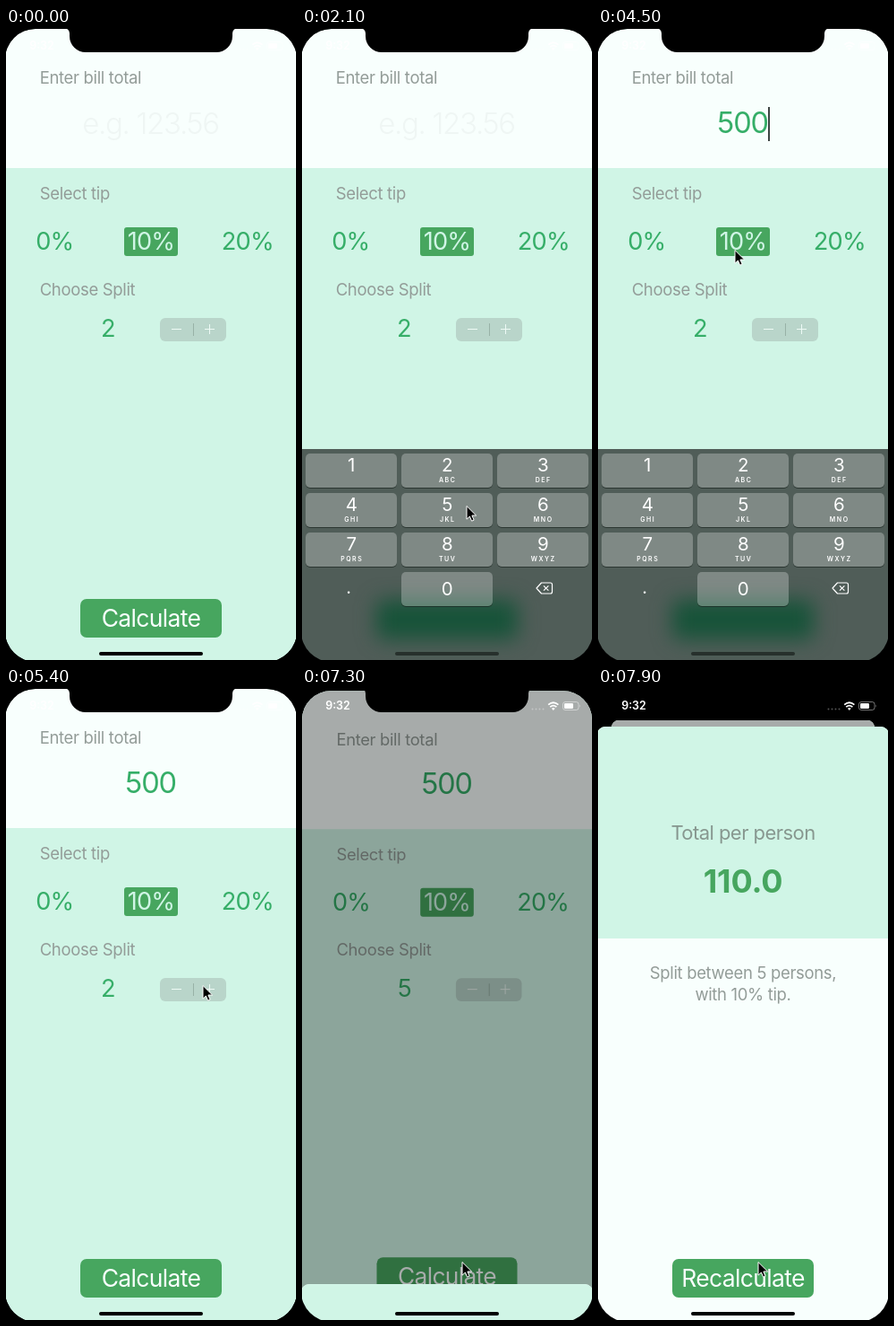
These frames come from a looping animation (324x704 px, 8 s). An HTML page:

```html
<!DOCTYPE html>
<html lang="en">
<head>
<meta charset="utf-8">
<title>Tip calculator</title>
<style>
  html, body { margin: 0; width: 100%; height: 100%; overflow: hidden; background: #000; }
  #stage { position: relative; width: 324px; height: 704px; overflow: hidden; background: #000;
    font-family: Inter, Roboto, "Liberation Sans", sans-serif; }
  #stage div, #stage svg { position: absolute; }
  .t { white-space: pre; line-height: 1; font-weight: 400; letter-spacing: -.025em; }
  .label { letter-spacing: -.018em; }
  #page { inset: 0; transform-origin: 50% 1px; }
  #dim { inset: 0 -1px -2px; background: #000; opacity: 0; }
  #board { left: 0; top: 469px; width: 324px; height: 235px; overflow: hidden; background: #505d58; }
  #glow { left: 83px; width: 158px; height: 44px; border-radius: 7px; background: #175339; filter: blur(11px); }
  .key { width: 102px; height: 38px; border-radius: 5px; background: rgba(255,255,255,.27);
    box-shadow: 0 1px 0 rgba(20,30,26,.6); }
  #sheet { left: -1px; top: 43px; width: 326px; height: 663px; overflow: hidden;
    border-radius: 9px 9px 0 0; background: #f8fffd; }
  #caret { width: 1.6px; height: 38px; top: 87.5px; background: #3c4543; }
  #home { left: 103.8px; top: 694.8px; width: 116.3px; height: 4.3px; border-radius: 2.2px; }
  #cursor { left: 0; top: 0; overflow: visible; }
</style>
</head>
<body>
<div id="stage">
  <div id="page"></div>
  <div id="board"><div id="glow"></div></div>
  <div id="sheet"></div>
  <svg id="status" width="324" height="40" fill="#fff">
    <g fill-opacity=".33"><circle cx="257.5" cy="23.5" r="1"/><circle cx="261.5" cy="23.5" r="1"/><circle cx="265.5" cy="23.5" r="1"/><circle cx="269.5" cy="23.5" r="1"/></g>
    <path d="M275.2 18.6q5.6-4.6 11.2 0M277.2 21.1q3.6-3 7.2 0" fill="none" stroke="#fff" stroke-width="1.8"/>
    <path d="M278.9 22.8q1.9-1.5 3.8 0l-1.9 2.2z"/>
    <rect x="291.5" y="15.5" width="17.5" height="9" rx="2.6" fill="none" stroke="#fff" stroke-opacity=".45"/>
    <rect x="293" y="17" width="10" height="6" rx="1.3"/>
    <path d="M310 18.5q1.6 1.5 0 3z" fill-opacity=".45"/>
  </svg>
  <div id="home"></div>
  <svg width="324" height="704">
    <path fill-rule="evenodd" d="M-2 0H326V707H-2ZM33 1H291a34 34 0 0 1 34 34V672a34 34 0 0 1-34 34H33a34 34 0 0 1-34-34V35a34 34 0 0 1 34-34Z"/>
    <path d="M65 0a6 6 0 0 1 6 6v3a18 18 0 0 0 18 18h146a18 18 0 0 0 18-18v-3a6 6 0 0 1 6-6z"/>
  </svg>
  <svg id="cursor" width="14" height="20">
    <path d="M.5.5V15.2L3.9 12l2.2 5.2 2.5-1.1L6.4 11h4.7z" stroke="#fff" stroke-width="1"/>
  </svg>
</div>
<script>
const $ = id => document.getElementById(id);
const page = $('page'), board = $('board'), sheet = $('sheet');
const GREEN = '#36ae68', BUTTON = '#47a65f', MINT = '#d0f5e6', PALE = '#f8fffd', GREY = '#939c98';

function add(parent, css, cls = '') {
  const el = document.createElement('div');
  el.className = cls;
  el.style.cssText = css;
  parent.append(el);
  return el;
}
const box = (parent, x, y, w, h, color, r = 0) =>
  add(parent, `left:${x}px;top:${y}px;width:${w}px;height:${h}px;background:${color};border-radius:${r}px`);

// y is the middle of the capitals; x is the centre
function text(parent, str, x, y, size, color, extra = '', cls = 't') {
  const el = add(parent, `left:${x}px;top:${y - .5}px;font-size:${size}px;color:${color};` +
    `transform:translate(-50%,-50%);${extra}`, cls);
  el.textContent = str;
  return el;
}
const label = (parent, str, x, y, extra) => text(parent, str, x, y, 18.5, GREY, extra, 't label');
const heading = (str, y) => label(page, str, 37.7, y, 'transform:translateY(-50%)');
const number = (str, x, y, color = GREEN) => text(page, str, x, y, 27.2, color, 'letter-spacing:-.03em');

function button(parent, str, x, y) {
  box(parent, x - 79.3, y - 21.7, 158.6, 43, BUTTON, 7);
  text(parent, str, x, y, 26.5, PALE);
}

// Entry page
box(page, -1, 0, 326, 706, MINT);
box(page, -1, 0, 326, 156.4, PALE);
heading('Enter bill total', 55.8);
const hint = text(page, 'e.g. 123.56', 161.5, 106.5, 33, '#eff6f4', 'font-weight:300;letter-spacing:-.04em');
const bill = text(page, '', 161.5, 106.5, 32.5, GREEN, 'letter-spacing:-.035em');
const caret = add(page, '');
caret.id = 'caret';
heading('Select tip', 184.7);
box(page, 131.8, 221.8, 60.4, 32.4, BUTTON, 3);
number('0%', 54.3, 238);
number('10%', 162, 238, MINT);
number('20%', 269.8, 238);
heading('Choose Split', 291.7);
const split = number('2', 114, 335);
box(page, 172, 323, 74, 25.5, '#b9d5ca', 6);
box(page, 208.7, 329, 1, 13.5, '#98b2a7');
box(page, 185, 335.3, 11, 1.2, '#eefaf5');
box(page, 222.3, 335.3, 11, 1.2, '#eefaf5');
box(page, 227.2, 330.4, 1.2, 11, '#eefaf5');
button(page, 'Calculate', 162, 657.3);
const dim = add(page, '');
dim.id = 'dim';

// Number pad
const letters = ['', 'ABC', 'DEF', 'GHI', 'JKL', 'MNO', 'PQRS', 'TUV', 'WXYZ'];
for (let i = 0; i < 10; i++) {
  const col = i < 9 ? i % 3 : 1, x = 4 + 107 * col, y = 4.5 + 44 * Math.floor(i / 3);
  add(board, `left:${x}px;top:${y}px`, 'key');
  text(board, String((i + 1) % 10), x + 51, y + (i < 9 ? 14 : 19.5), 20.5, '#fff');
  if (letters[i]) text(board, letters[i], x + 51.7, y + 29.8, 7, '#fff', 'font-weight:600;letter-spacing:1.5px');
}
text(board, '.', 52, 154, 20, '#fff');
board.insertAdjacentHTML('beforeend',
  `<svg style="left:261px;top:148px" width="20" height="14" fill="none" stroke="#fff" stroke-width="1.2" stroke-linejoin="round">
    <path d="M1 7L6.5 1H16.5Q18.5 1 18.5 3V11Q18.5 13 16.5 13H6.5ZM9 4.3L14.4 9.7M14.4 4.3L9 9.7"/></svg>`);

// Result sheet
box(sheet, 0, 0, 326, 236, MINT);
text(sheet, 'Total per person', 163, 118.7, 22, '#87978f');
text(sheet, '110.0', 163, 172.2, 36, BUTTON, 'font-weight:700;letter-spacing:-.005em');
label(sheet, 'Split between 5 persons,', 163, 274.7);
label(sheet, 'with 10% tip.', 163, 298.2);
button(sheet, 'Recalculate', 163, 614.3);

text($('stage'), '9:32', 40, 20.7, 12.5, '#fff', 'font-weight:600;letter-spacing:0');
$('stage').append($('cursor'));

// Pointer stops: time, x, y
const path = [
  [100, 200, 641], [600, 160, 118], [1100, 160, 118], [1200, 179.5, 349], [1500, 184, 525],
  [1800, 183.5, 532], [2100, 183.5, 532], [2300, 183, 541], [2700, 183, 541], [3100, 164, 620],
  [4000, 164, 620], [4500, 152.5, 247], [4800, 152.5, 247], [5300, 219, 331],
  [5400, 219.5, 331], [6200, 219.5, 331], [6800, 178.5, 639], [8000, 178.5, 639]
];
const bills = [[0, ''], [2500, '5'], [3400, '50'], [3800, '500']];
const splits = [[0, '2'], [5500, '3'], [5800, '4'], [6100, '5']];

const latest = (steps, t) => steps.filter(s => s[0] <= t).pop()[1];

function pointer(t) {
  const i = Math.max(1, path.findIndex(p => p[0] >= t));
  const [t0, x0, y0] = path[i - 1], [t1, x1, y1] = path[i];
  const u = Math.max(0, (t - t0) / (t1 - t0)), e = u * u * (3 - 2 * u);
  return [x0 + (x1 - x0) * e, y0 + (y1 - y0) * e];
}

// Critically damped spring from 0 to 1
function spring(ms, rate) {
  if (ms <= 0) return 0;
  const u = ms * rate, p = 1 - (1 + u) * Math.exp(-u);
  return p > .99 ? 1 : p;
}

function render(t) {
  const amount = latest(bills, t);
  bill.textContent = amount;
  hint.style.opacity = amount ? 0 : 1;
  split.textContent = latest(splits, t);

  const editing = t >= 1200 && t < 4700;
  caret.style.opacity = editing && (t - 1200) % 1000 < 600 ? 1 : 0;
  caret.style.left = (amount ? 161.5 + bill.offsetWidth / 2 : 84) + 'px';

  const up = spring(t - 1099, .016) - spring(t - 4650, .016);
  const drop = 235 * (1 - up);
  board.style.transform = `translateY(${drop}px)`;
  board.style.visibility = up > 0 ? 'visible' : 'hidden';
  $('glow').style.top = 168 - drop + 'px';
  $('home').style.background = up > .9 ? '#27302c' : '#000';

  const open = spring(t - 7271, .014);
  sheet.style.transform = `translateY(${663 * (1 - open)}px)`;
  page.style.transform = `translateY(${35 * open}px) scale(${1 - .098 * open})`;
  page.style.clipPath = `inset(1px -1px -2px round ${34 - 25 * open}px)`;
  dim.style.opacity = open ? .33 : 0;

  const [x, y] = pointer(t);
  $('cursor').style.transform = `translate(${x}px,${y}px)`;
  $('cursor').style.opacity = t < 100 ? 0 : 1;
}

const start = performance.now();
function tick() {
  const t = (performance.now() - start) % 8000;
  render(Math.floor(t / 100) * 100);
  requestAnimationFrame(tick);
}
tick();
</script>
</body>
</html>
```
